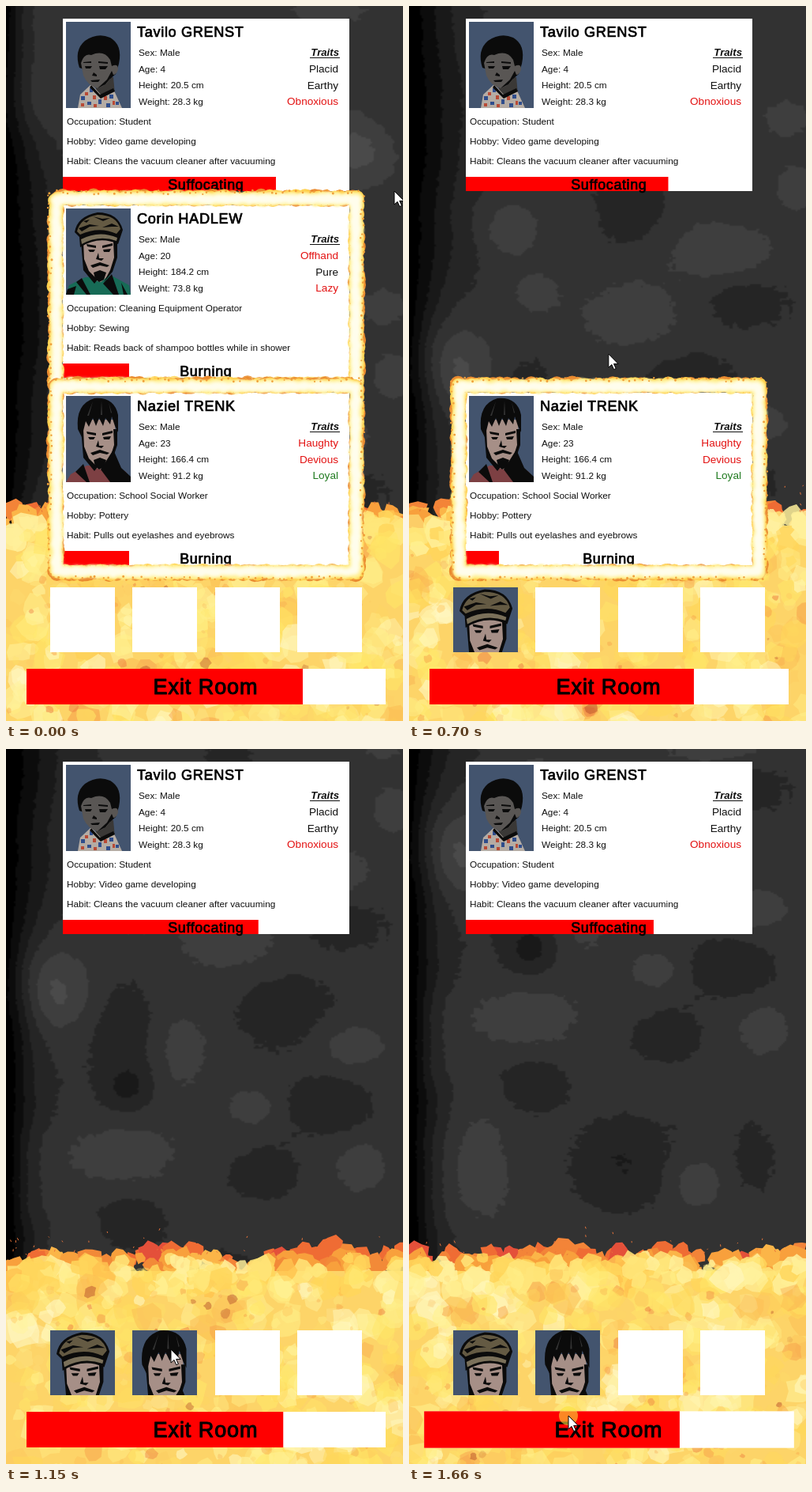
Animation, 503 px wide and 904 px high, one loop 1680 ms. Source, as an HTML page with a canvas:

```html
<!DOCTYPE html>
<html lang="en">
<head>
<meta charset="utf-8">
<title>Rescue room</title>
<style>
  html, body { margin: 0; width: 100%; height: 100%; overflow: hidden; background: #303030; }
  canvas { display: block; }
</style>
</head>
<body>
<canvas id="stage" width="503" height="904"></canvas>
<script>
const W = 503, H = 904, LOOP = 1680, RISE = 0.34;
const FONT = '"Liberation Sans", Arial, sans-serif';
const INK = '#0b0b0b', RED = '#e31212', GREEN = '#1f7a1f';
const ctx = document.getElementById('stage').getContext('2d');

const clamp = (v, a = 0, b = 1) => Math.min(b, Math.max(a, v));
const smooth = v => v * v * (3 - 2 * v);
const mix = (a, b, k) => a + (b - a) * k;
const rnd = n => { const s = Math.sin(n * 127.1 + 11.7) * 43758.5453; return s - Math.floor(s); };

function noise(x, y) {
  const i = Math.floor(x), j = Math.floor(y), u = smooth(x - i), v = smooth(y - j);
  const at = (a, b) => rnd(a + b * 57.31);
  return mix(mix(at(i, j), at(i + 1, j), u), mix(at(i, j + 1), at(i + 1, j + 1), u), v);
}

/* Smoke: one tall posterised sheet that scrolls upwards. */
// x, y, x radius, y radius, brightness steps
const CLOUDS = [
  [440, 185, 48, 45, 2.2], [30, 90, 60, 70, 1], [400, 5, 70, 35, 1],
  [480, 375, 40, 30, 1], [127, 522, 36, 34, 1.5], [490, 470, 28, 30, 1.3],
  [395, 550, 72, 38, 1.7], [280, 460, 45, 85, -1.1], [60, 702, 46, 48, 2.4],
  [160, 599, 30, 28, 1.2], [285, 629, 75, 55, 1.2], [148, 745, 45, 65, -1.2],
  [350, 715, 46, 42, -1.2], [420, 610, 50, 35, -1.1], [222, 768, 42, 48, 1.4],
  [440, 766, 38, 28, 1.2], [405, 842, 55, 35, -1.1], [155, 818, 32, 28, -1.4],
  [145, 903, 72, 42, 1.3], [312, 843, 32, 24, 1.3], [452, 918, 34, 34, 1.2],
  [320, 930, 45, 32, -1.1], [165, 988, 42, 30, -1.2], [265, 1090, 50, 52, -1.2],
  [90, 1090, 40, 75, 1.2], [365, 1114, 32, 35, 1.6], [435, 1075, 34, 55, -0.8]
];
const smoke = makeSmoke();

function makeSmoke() {
  const c = document.createElement('canvas');
  c.width = 252; c.height = 620;
  const g = c.getContext('2d'), img = g.createImageData(c.width, c.height);
  for (let j = 0, p = 0; j < c.height; j++) {
    const y = j * 2, near = CLOUDS.filter(b => Math.abs(y - b[1]) < b[3] * 2.4);
    const band = 20 + 34 * Math.exp(-(((y - 400) / 200) ** 2)) + 14 * noise(3, y / 60);
    for (let i = 0; i < c.width; i++, p += 4) {
      const x = i * 2;
      let v = 4.35 - 4 * Math.exp(-((x / band) ** 1.4));
      v += 0.5 * (noise(x / 70, y / 70) - 0.5) + 0.22 * (noise(x / 7, y / 4) - 0.5);
      for (const [bx, by, rx, ry, amp] of near)
        v += amp * Math.exp(-(((x - bx) / rx) ** 2) - ((y - by) / ry) ** 2);
      const shade = clamp(Math.floor(v), 0, 8) * 12.4;
      img.data[p] = img.data[p + 1] = img.data[p + 2] = shade;
      img.data[p + 3] = 255;
    }
  }
  g.putImageData(img, 0, 0);
  return c;
}

/* Fire: rising puffs; palettes run from the hottest to the coolest colour. */
function puff(x, y, r, seed) {
  ctx.beginPath();
  for (let k = 0; k < 10; k++) {
    const a = k * Math.PI / 5, d = r * (0.68 + 0.5 * rnd(seed + k * 3.7));
    ctx.lineTo(x + Math.cos(a) * d, y + Math.sin(a) * d);
  }
  ctx.fill();
}

function puffs(t, o) {
  for (let i = 0; i < o.count; i++) {
    const id = o.seed + i * 17.3, age = t / o.life + rnd(id);
    const p = age % 1, s = id + Math.floor(age) * 91.7, pulse = Math.sin(Math.PI * p);
    const x = rnd(s + 3) * W, y = mix(o.top, o.bottom, rnd(s + 2)) - o.rise * (p - 0.5);
    const heat = 0.9 * noise(x / 38, y / 38 + t / 400) + 0.55 * rnd(s + 1) - 0.25;
    ctx.globalAlpha = o.alpha * (o.fade ? pulse : 1);
    ctx.fillStyle = o.colors[Math.floor(clamp(heat, 0, 0.99) * o.colors.length)];
    puff(x, y, mix(o.small, o.big, rnd(s + 4)) * (0.45 + 0.55 * pulse), s);
  }
  ctx.globalAlpha = 1;
}

function drawFire(t) {
  puffs(t, { count: 42, seed: 5, life: 620, colors: ['#f38438', '#ef6c34', '#e4503a'],
    top: 636, bottom: 654, rise: 14, small: 10, big: 22, alpha: 1 });
  puffs(t, { count: 64, seed: 900, life: 560, colors: ['#fbb548', '#f8a03c', '#f28a38'],
    top: 643, bottom: 662, rise: 14, small: 9, big: 20, alpha: 1 });
  ctx.fillStyle = '#fdd468';
  ctx.fillRect(0, 660, W, H - 660);
  puffs(t, { count: 120, seed: 2100, life: 700, colors: ['#fff09a', '#ffe67a', '#ffd65c', '#ffc450'],
    top: 650, bottom: 682, rise: 16, small: 9, big: 20, alpha: 0.85 });
  puffs(t, { count: 480, seed: 5200, life: 800, fade: true,
    colors: ['#fff9c4', '#fff4a0', '#fff08a', '#ffe768', '#ffd95a', '#fcbf55', '#f6a04a'],
    top: 670, bottom: 920, rise: 36, small: 7, big: 23, alpha: 0.6 });
  puffs(t, { count: 90, seed: 9400, life: 600, fade: true, colors: ['#ffc860', '#f6a048', '#ec7a40', '#b8502c'],
    top: 676, bottom: 912, rise: 26, small: 2, big: 9, alpha: 0.5 });
  ctx.strokeStyle = '#e8743a';
  ctx.lineWidth = 1;
  ctx.beginPath();
  for (let i = 0; i < 34; i++) {
    const age = t / 420 + rnd(i + 40), s = i * 7.9 + Math.floor(age) * 31;
    const x = rnd(s) * W, y = 640 - 42 * (age % 1) * rnd(s + 1);
    ctx.moveTo(x, y);
    ctx.lineTo(x + 3 * (rnd(s + 2) - 0.5), y - 1 - 2 * rnd(s + 3));
  }
  ctx.stroke();
}

/* Burning rim around a card: ragged discs strung along its outline. */
function perimeter(d, x, y, w, h) {
  if (d < w) return [x + d, y];
  if ((d -= w) < h) return [x + w, y + d];
  if ((d -= h) < w) return [x + w - d, y + h];
  return [x, y + h - (d - w)];
}

function rim(t, top, seed, color, { grow, radius, jitter, step = 4, blur = 0 }) {
  const box = [72 - grow, top - grow, 363 + 2 * grow, 218 + 2 * grow];
  const tick = Math.floor(t / 60) * 13.7;
  ctx.filter = blur ? `blur(${blur}px)` : 'none';
  ctx.fillStyle = color;
  ctx.beginPath();
  for (let d = 0, i = 0; d < 2 * (box[2] + box[3]); d += step, i++) {
    const s = top + seed + i * 5.3 + tick, [x, y] = perimeter(d, ...box);
    const r = radius * (0.8 + 0.4 * rnd(s));
    const px = x + jitter * (rnd(s + 1) - 0.5), py = y + jitter * (rnd(s + 2) - 0.5);
    ctx.moveTo(px + r, py);
    ctx.arc(px, py, r, 0, 7);
  }
  ctx.fill();
  ctx.filter = 'none';
}

function drawRim(t, top) {
  rim(t, top, 0, '#ea8a2e', { grow: 9.5, radius: 8.6, jitter: 4 });
  rim(t, top, 50, '#ffd04c', { grow: 9, radius: 8.3, jitter: 3.5 });
  rim(t, top, 90, '#ffee86', { grow: 8.5, radius: 7.6, jitter: 3, blur: 1 });
  rim(t, top, 140, '#fffdec', { grow: 8, radius: 6, jitter: 2, blur: 2 });
  rim(t, top, 200, '#f0a03a', { grow: 16.5, radius: 1.3, jitter: 5, step: 8 });
  rim(t, top, 260, '#f7bd55', { grow: 0.5, radius: 0.5, jitter: 1.6, step: 8 });
}

/* Portraits, drawn in an 82 x 109 box */
const FACE = '#a68f87';
const FEATURES = [INK, `M26 45L38 47L38 50L27 48ZM46 47L59 44L59 47L46 50Z
  M28 52L37 52L35 55L30 55ZM47 52L57 51L55 55L48 55Z
  M41 56L38 64L45 66L48 63L42 63ZM31 72L43 68L55 72L52 74L43 72L34 75Z
  M35 81L43 78L51 81L48 90L42 93L37 89Z`];
const SHADOW = [INK, `M19 42L22 42L23 64L29 79L40 90L36 95L22 78Z
  M60 42L65 42L65 62L59 80L48 93L56 78L61 62Z`];
const HEAD = [FACE, 'M20 30L62 30L63 62Q60 82 44 93Q28 90 22 68Z'];
const PORTRAITS = {
  boy: [
    ['#3a3836', 'M36 72L60 70L62 92L40 96Z'],
    ['#b5aca4', 'M15 109L18 92L32 79L44 92L60 85L71 109Z'],
    ['#2f4d8c', 'M19 94h5v5h-5zM30 84h4v5h-4zM27 101h5v4h-5zM41 98h4v6h-4zM55 92h5v5h-5zM51 103h5v5h-5zM63 101h4v4h-4z'],
    ['#b94a35', 'M24 89h4v4h-4zM34 93h4v5h-4zM19 103h4v4h-4zM35 104h4v4h-4zM48 94h4v5h-4zM59 100h3v5h-3z'],
    [INK, 'M32 80L43 92L60 84L62 88L44 97L30 83Z'],
    [INK, 'M17 58Q10 36 24 24Q40 13 56 20Q72 29 67 53L63 66L56 72Z'],
    ['#595654', 'M19 52Q23 39 32 42Q48 35 56 48L58 56Q66 52 66 60Q64 68 58 67Q54 80 40 84Q28 81 22 68Z'],
    [INK, 'M22 51L32 50L32 52L22 52ZM41 50L53 51L53 53L41 52ZM24 56L33 56L31 59L25 59ZM42 56L53 56L50 60L43 60ZM35 64L33 68L39 69L39 67ZM31 74L43 73L41 76L33 76ZM58 62L60 67L50 79L40 84L52 73Z']
  ],
  cap: [
    ['#176b56', 'M0 109L4 97L24 87L58 85L80 97L82 109Z'],
    [INK, 'M20 88L31 109L26 109L13 93ZM58 83L67 109L60 109L47 95ZM2 102L13 98L10 109L0 109ZM70 94L78 109L73 109Z'],
    HEAD, SHADOW, FEATURES,
    [INK, 'M11 30Q14 10 40 5Q66 5 72 27L66 45Q42 34 18 49L17 36Z'],
    ['#645a43', 'M14 29Q18 12 40 8Q64 8 69 26L64 32Q42 22 18 33Z'],
    ['#7a705a', 'M19 39Q42 27 65 37L64 41Q42 33 20 45Z'],
    [INK, 'M16 25L30 20L42 22L30 23L20 29ZM34 10L46 13L56 12L47 16ZM46 24L58 19L67 23L58 23ZM22 16L30 14L26 18Z']
  ],
  fringe: [
    ['#7d4043', 'M0 109L6 99L26 88L60 88L76 96L82 109Z'],
    HEAD, SHADOW, FEATURES,
    [INK, 'M60 68L70 91L82 102L82 109L56 109L44 93ZM22 86L30 109L26 109L12 96Z'],
    [INK, 'M15 42Q12 10 36 3Q61 1 66 24L66 46L62 38L58 26L56 36L50 28L47 38L42 28L38 38L34 28L29 39L25 32L20 52Z'],
    ['#343434', 'M34 7L27 25L29 25ZM45 6L44 24L46 24ZM54 8L57 22L58 21Z']
  ]
};
for (const shapes of Object.values(PORTRAITS))
  for (const s of shapes) if (typeof s[1] === 'string') s[1] = new Path2D(s[1]);

function portrait(name, x, y, w, h, zoom = 1) {
  ctx.save();
  ctx.translate(x, y);
  ctx.beginPath();
  ctx.rect(0, 0, w, h);
  ctx.clip();
  ctx.fillStyle = '#43546e';
  ctx.fillRect(0, 0, w, h);
  ctx.translate(41 - 41 * zoom, zoom > 1 ? -3 : 0);
  ctx.scale(zoom, zoom);
  for (const [color, path] of PORTRAITS[name]) {
    ctx.fillStyle = color;
    ctx.fill(path);
  }
  ctx.restore();
}

/* Interface */
function text(str, x, y, size, { color = '#111', align = 'left', style = '', heavy = false } = {}) {
  ctx.font = `${style} ${size}px ${FONT}`;
  ctx.letterSpacing = heavy ? `${size * 0.035}px` : '0px';
  ctx.textAlign = align;
  ctx.fillStyle = ctx.strokeStyle = color;
  ctx.fillText(str, x, y);
  if (heavy) {
    ctx.lineWidth = size * 0.04;
    ctx.lineJoin = 'round';
    ctx.strokeText(str, x, y);
  }
}

function bar(x, y, w, h, fill) {
  ctx.fillStyle = '#fff';
  ctx.fillRect(x, y, w, h);
  ctx.fillStyle = '#f00';
  ctx.fillRect(x, y, fill, h);
}

function scaled(cx, cy, k, draw) {
  ctx.save();
  ctx.translate(cx, cy);
  ctx.scale(k, k);
  ctx.translate(-cx, -cy);
  draw();
  ctx.restore();
}

const hover = (t, from, to, size) =>
  1 + (size - 1) * clamp(Math.min((t - from) / 50, (to - t) / 50));

const CARDS = [
  { top: 16, name: 'Tavilo GRENST', face: 'boy', status: 'Suffocating', life: [270, 0.0193],
    facts: ['Sex: Male', 'Age: 4', 'Height: 20.5 cm', 'Weight: 28.3 kg'],
    traits: [['Placid'], ['Earthy'], ['Obnoxious', RED]],
    notes: ['Occupation: Student', 'Hobby: Video game developing', 'Habit: Cleans the vacuum cleaner after vacuuming'] },
  { top: 252, name: 'Corin HADLEW', face: 'cap', status: 'Burning', life: [84, 0.06], over: 60, gone: 420,
    facts: ['Sex: Male', 'Age: 20', 'Height: 184.2 cm', 'Weight: 73.8 kg'],
    traits: [['Offhand', RED], ['Pure'], ['Lazy', RED]],
    notes: ['Occupation: Cleaning Equipment Operator', 'Hobby: Sewing', 'Habit: Reads back of shampoo bottles while in shower'] },
  { top: 489, name: 'Naziel TRENK', face: 'fringe', status: 'Burning', life: [84, 0.06], over: 750, gone: 940,
    facts: ['Sex: Male', 'Age: 23', 'Height: 166.4 cm', 'Weight: 91.2 kg'],
    traits: [['Haughty', RED], ['Devious', RED], ['Loyal', GREEN]],
    notes: ['Occupation: School Social Worker', 'Hobby: Pottery', 'Habit: Pulls out eyelashes and eyebrows'] }
];

function drawCard(t, c) {
  const y = c.top, [full, drain] = c.life;
  ctx.fillStyle = '#fff';
  ctx.fillRect(72, y, 363, 218);
  portrait(c.face, 76, y + 4, 82, 109);
  text(c.name, 166, y + 22.5, 18.2, { heavy: true, color: '#000' });
  c.facts.forEach((f, i) => text(f, 168, y + 47 + i * 20.5, 11.8));
  c.notes.forEach((n, i) => text(n, 77, y + 134 + i * 25, 11.8));
  text('Traits', 422, y + 47, 13.2, { align: 'right', style: 'italic bold' });
  ctx.fillRect(385, y + 49, 38, 1);
  c.traits.forEach(([word, color], i) =>
    text(word, 421, y + 68 + i * 20.5, 13.6, { align: 'right', color }));
  bar(72, y + 200, 363, 18, full - drain * t);
  text(c.status, 253.3, y + 216, 17.9, { align: 'center', heavy: true, color: '#000' });
}

function drawSlots(t) {
  const filled = [t >= 420 && 'cap', t >= 940 && 'fringe'];
  [56, 160, 265, 369].forEach((x, i) => {
    const k = i === 1 ? hover(t, 1170, 1540, 1.085) : 1;
    scaled(x + 41, 776, k, () => {
      if (filled[i]) return portrait(filled[i], x, 735, 82, 82, 1.1);
      ctx.fillStyle = '#fff';
      ctx.fillRect(x, 735, 82, 82);
    });
  });
}

function drawExit(t) {
  scaled(253.5, 860.5, hover(t, 1530, Infinity, 1.03), () => {
    bar(26, 838, 455, 45, 350 - 0.0215 * t);
    text('Exit Room', 253, 870, 27, { align: 'center', heavy: true, color: '#000' });
  });
}

// time, x, y
const PATH = [[0, 492, 234], [220, 269, 346], [560, 269, 346], [840, 237, 532],
  [930, 237, 532], [1140, 209, 759], [1250, 209, 762], [1480, 204, 831], [1640, 202, 843], [LOOP, 202, 843]];
const CLICKS = [[330, 420], [850, 940], [1640, LOOP]];
const ARROW = new Path2D('M0 0V17L4 13.4L6.8 19.6L9.4 18.4L6.7 12.4H12.2Z');

function drawCursor(t) {
  const i = PATH.findIndex(p => p[0] > t), [t0, x0, y0] = PATH[i - 1], [t1, x1, y1] = PATH[i];
  const k = smooth((t - t0) / (t1 - t0));
  ctx.save();
  ctx.translate(mix(x0, x1, k), mix(y0, y1, k));
  if (CLICKS.some(([a, b]) => t >= a && t < b)) {
    ctx.fillStyle = 'rgba(250,225,60,.6)';
    ctx.beginPath();
    ctx.arc(0, 0, 12, 0, 7);
    ctx.fill();
  }
  ctx.fillStyle = '#fff';
  ctx.strokeStyle = '#000';
  ctx.lineWidth = 1;
  ctx.fill(ARROW);
  ctx.stroke(ARROW);
  ctx.restore();
}

const start = performance.now();
function frame() {
  const t = Math.max(0, performance.now() - start) % LOOP;
  ctx.drawImage(smoke, 0, -RISE * t, 504, 1240);
  drawFire(t);
  const alive = CARDS.filter(c => !c.gone || t < c.gone);
  for (const c of alive) {
    const k = c.gone ? hover(t, c.over, Infinity, 1.036) : 1;
    scaled(253.5, c.top + 109, k, () => drawCard(t, c));
  }
  for (const c of alive) if (c.gone) drawRim(t, c.top);
  drawSlots(t);
  drawExit(t);
  drawCursor(t);
  requestAnimationFrame(frame);
}
frame();
</script>
</body>
</html>
```
